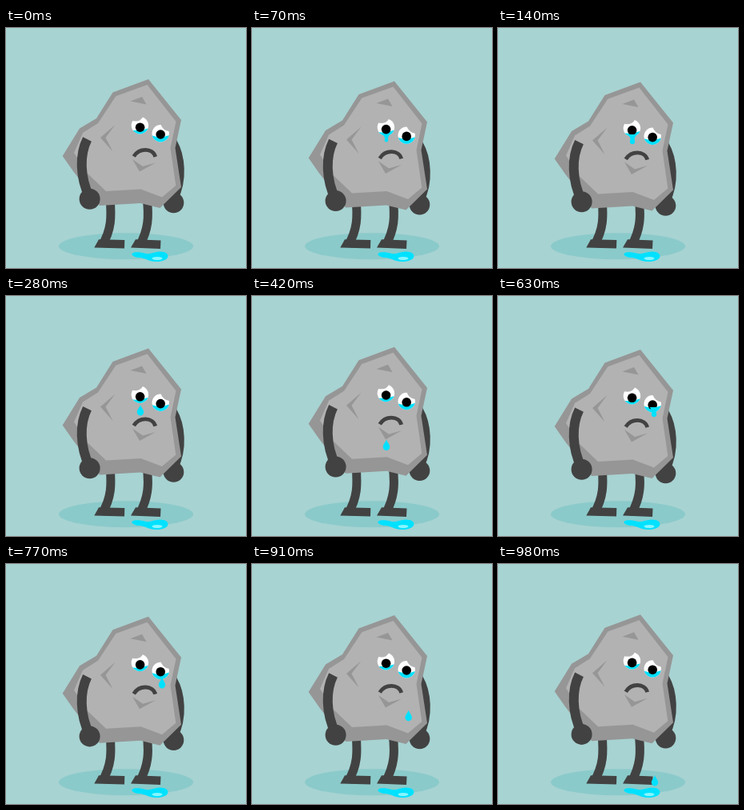
Recreate the animation shown at these times as an HTML page. Size 300 by 300 pixels, loop 1050 ms.

```html
<!DOCTYPE html>
<html lang="en">
<head>
<meta charset="utf-8">
<title>Sad rock</title>
<style>
html, body { margin: 0; width: 100%; height: 100%; overflow: hidden; background: #a7d3d2; }
svg { display: block; width: 100vw; height: 100vh; }
.limb { fill: none; stroke: #424242; stroke-width: 12; }
.leg { stroke-width: 11; }
.dark { fill: #424242; }
.edge { fill: #969696; }
.face { fill: #b2b2b2; }
.water { fill: #00e1ff; }
</style>
</head>
<body>
<svg viewBox="0 0 300 300">
  <defs>
    <clipPath id="leftEye"><circle cx="167.4" cy="121.7" r="10.7"/></clipPath>
    <clipPath id="rightEye"><circle cx="193.2" cy="131.7" r="10.7"/></clipPath>
  </defs>
  <ellipse cx="150" cy="272.7" rx="84" ry="16.5" fill="#8bcaca"/>

  <path class="limb leg" d="M130 212 C132 236 132 252 120 272"/>
  <path class="dark" d="M110.3 274.5 L116 264.3 L148.3 265 L148 275.5Z"/>
  <path class="limb leg" d="M176 212 C179 236 178 252 167 272"/>
  <path class="dark" d="M156 274.5 L162 264.3 L193.5 265.5 L193 276Z"/>
  <path class="water" d="M158 281.5 C161 279.5 168 280 175 282 C181 283 186 279.5 192 279.5 C200 279.5 204 283 202 287 C199 292 188 293 180 291 C174 289 171 287 165 287 C159 286 156 283 158 281.5Z"/>
  <ellipse cx="189" cy="288" rx="6.5" ry="2" fill="#86f5ff"/>

  <g id="body">
    <path class="limb" d="M208 143 C218 160 221 190 209 213"/>
    <circle class="dark" cx="209.5" cy="218.4" r="12.8"/>
    <path class="edge" d="M178 64 L219 115 L211.5 150 L219 199 L192.5 225 L168 219 L117 222 L84 179 L70.7 160 L92 125.5 L113 113 L133.5 80.5Z"/>
    <path class="face" d="M176.5 71 L212.5 117 L205.5 150 L212.3 197 L195 211.5 L168.5 201.5 L125 204 L102 182 L85 156 L96 131 L115 119 L137.3 85.2Z"/>
    <path class="edge" d="M155.5 91.5 L170 86 L175.5 95.5Z"/>
    <path class="edge" d="M136.5 121 L118 137 L133.5 154.5 L124.5 137Z"/>
    <path class="edge" d="M158 164 L171 173 L187 168.5 L167 179.5Z"/>

    <g clip-path="url(#leftEye)">
      <path fill="#fff" d="M155 115 Q168 120 172 109 L180 109 V134 H155Z"/>
      <path class="water" d="M155 127.5 Q168 129.5 180 124.5 V134 H155Z"/>
    </g>
    <circle cx="167.6" cy="124.2" r="5.8"/>
    <g clip-path="url(#rightEye)">
      <path fill="#fff" d="M181 119 L193 119 Q195.5 129 206 129.5 V144 H181Z"/>
      <path class="water" d="M181 134 Q194 139 206 133 V144 H181Z"/>
    </g>
    <circle cx="193.2" cy="133" r="5.8"/>
    <path fill="none" stroke="#424242" stroke-width="4.8" d="M159.7 160.5 C166.5 149.5 183.5 149.5 186.7 161"/>

    <path class="limb" d="M101.5 139 C92 158 92 186 104.5 212"/>
    <circle class="dark" cx="104.6" cy="213.7" r="13"/>
  </g>
  <g class="water" id="tears">
    <g><path/><path/></g>
    <g><path/><path/></g>
  </g>
</svg>
<script>
const STEP = 70, STEPS = 15;
const bob = [0, 2.4, 3.6, 2.6, 1.6, .6, -.2, -.5, 1.5, 3.1, 2.8, 1.7, .8, 0, -.8];
const tears = [
  { x: 168, y: 143, drift: 0, land: 273, start: 1 },
  { x: 195, y: 149, drift: 1, land: 271, start: 8 }
];
const SWELL_STEPS = 3, FALL_STEPS = 3;
const DROP = "M0 -7 C1.5 -3 4.2 -1 4.2 2.2 A4.2 4.2 0 0 1 -4.2 2.2 C-4.2 -1 -1.5 -3 0 -7Z";
const NECK = "M-7 -10 L7 -10 Q3 -5 3 1 H-3 Q-3 -5 -7 -10Z";
const body = document.getElementById("body");
const nodes = [...document.getElementById("tears").children];
nodes.forEach(g => {
  g.children[0].setAttribute("d", DROP);
  g.children[1].setAttribute("d", NECK);
});

// Swell under the eye, then fall with growing speed.
function placeTear(node, tear, step) {
  const age = step - tear.start;
  const shown = age >= 0 && age <= SWELL_STEPS + FALL_STEPS;
  node.setAttribute("visibility", shown ? "visible" : "hidden");
  if (!shown) return;
  const swell = Math.min(1, .55 + age * .2);
  const hang = Math.min(0, (age - SWELL_STEPS) * 1.3);
  const fallen = Math.max(0, (age - SWELL_STEPS) / FALL_STEPS);
  const x = tear.x + tear.drift * fallen;
  const y = tear.y + hang + (tear.land - tear.y) * Math.pow(fallen, 2.7);
  node.setAttribute("transform", `translate(${x} ${y}) scale(${swell})`);
  node.children[1].setAttribute("visibility", age < 2 ? "inherit" : "hidden");
}

function draw(now) {
  const step = Math.floor(now / STEP) % STEPS;
  body.setAttribute("transform", `translate(0 ${bob[step]})`);
  tears.forEach((tear, i) => placeTear(nodes[i], tear, step));
}

const origin = performance.now();
function tick() {
  draw(performance.now() - origin);
  requestAnimationFrame(tick);
}
tick();
</script>
</body>
</html>
```
